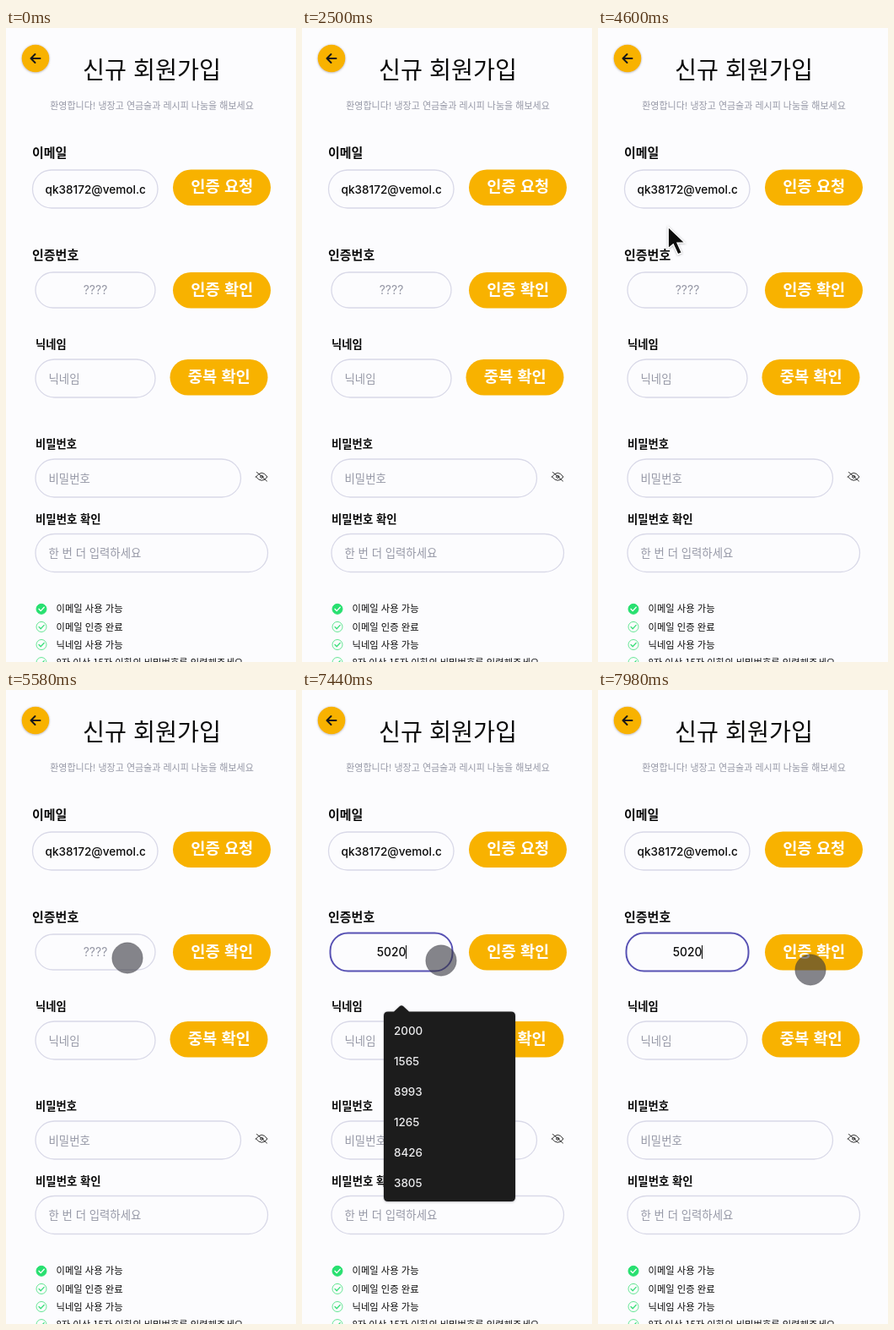
An HTML page for the animation above (8000 ms loop, 344x750 px).

```html
<!DOCTYPE html>
<html lang="ko">
<head>
<meta charset="utf-8">
<title>신규 회원가입</title>
<style>
  html, body { margin: 0; width: 100%; height: 100%; overflow: hidden; background: #fcfcfe; }
  svg { display: block; width: 344px; height: 750px; font-family: 'Noto Sans CJK KR', 'Noto Sans CJK', sans-serif; }
  .latin { font-family: Inter, Roboto, sans-serif; }
  .field { fill: none; stroke: #d9d9e8; stroke-width: 1.3; }
  .focused .field { stroke: #5852b4; stroke-width: 2; }
  .button { fill: #f8b200; }
  .line { fill: none; stroke-linecap: round; stroke-linejoin: round; }
</style>
</head>
<body>
<svg id="stage" viewBox="0 0 344 750">
  <defs>
    <clipPath id="emailClip"><rect x="46" y="170" width="119" height="42"/></clipPath>
    <filter id="soft" x="-50%" y="-50%" width="200%" height="200%">
      <feDropShadow dx="0" dy="0.5" stdDeviation="1.2" flood-color="#444450" flood-opacity=".5"/>
    </filter>
  </defs>
  <rect width="344" height="750" fill="#fcfcfe"/>
  <g id="form"></g>

  <circle cx="35" cy="36" r="16.3" fill="#f8b200" filter="url(#soft)"/>
  <path class="line" d="M40.5 36H29.5M34.5 31L29.5 36L34.5 41" stroke="#181818" stroke-width="2"/>

  <g class="line" stroke="#181818" stroke-width=".9">
    <path d="M296.5 531Q303.5 521.5 310 531Q303.5 539.5 296.5 531ZM297.5 525.5L309.5 536"/>
    <circle cx="303.3" cy="530.8" r="1.6"/>
  </g>

  <g id="code"></g>
  <g id="menu">
    <path d="M102 380.5H109L116 374Q118 372.3 120 374L127 380.5H248Q253 380.5 253 385.5V600Q253 605 248 605H102Q97 605 97 600V385.5Q97 380.5 102 380.5Z" fill="#1c1c1d" filter="url(#soft)"/>
  </g>
  <g id="pointer">
    <path id="arrow" d="M0 0V25.5L6 20.5L11.5 32.5L16 30.5L10.7 18.8L19.5 18.5Z" fill="#080808" stroke="#fff" stroke-width="1.3" filter="url(#soft)"/>
    <circle id="touch" r="18.2" fill="#36363e" fill-opacity=".6" stroke="#36363e" stroke-opacity=".3"/>
  </g>
</svg>
<script>
const $ = id => document.getElementById(id);
const form = $('form'), code = $('code'), menu = $('menu');

function add(parent, tag, attrs, content = '') {
  const node = document.createElementNS('http://www.w3.org/2000/svg', tag);
  for (const key in attrs) node.setAttribute(key, attrs[key]);
  node.textContent = content;
  return parent.appendChild(node);
}

// y is the vertical middle of the glyphs
function text(parent, content, x, y, size, weight, fill, extra = {}) {
  return add(parent, 'text', {x, y: y + size * .37, 'font-size': size, 'font-weight': weight, fill, ...extra}, content);
}

function pill(parent, kind, left, top, right, bottom) {
  return add(parent, 'rect', {class: kind, x: left, y: top, width: right - left, height: bottom - top, rx: (bottom - top) / 2});
}

const ink = '#0a0a0a', muted = '#9698a6';
const latin = {class: 'latin'}, middle = {'text-anchor': 'middle'};

text(form, '신규 회원가입', 173, 49.5, 28.3, 300, ink, middle);
text(form, '환영합니다! 냉장고 연금술과 레시피 나눔을 해보세요', 173, 91.5, 11, 300, muted, middle);

const labels = [
  ['이메일', 31, 147, 15], ['인증번호', 31, 268, 15], ['닉네임', 35, 374, 13.3],
  ['비밀번호', 35, 492, 13.3], ['비밀번호 확인', 35, 581, 13.4],
];
for (const [label, x, y, size] of labels) text(form, label, x, y, size, 700, ink);

pill(form, 'field', 31.5, 168, 180, 213);
text(form, 'qk38172@vemol.c', 46.5, 191, 13.6, 500, ink, {...latin, 'clip-path': 'url(#emailClip)'});

const inputs = [['닉네임', 392, 177], ['비밀번호', 510, 278.5], ['한 번 더 입력하세요', 598.5, 310.5]];
for (const [hint, top, right] of inputs) {
  pill(form, 'field', 35, top, right, top + 45);
  text(form, hint, 50.5, top + 23, 13.4, 500, muted);
}

const buttons = [['인증 요청', 198, 167.5], ['인증 확인', 198, 289], ['중복 확인', 194.5, 392]];
for (const [label, left, top] of buttons) {
  pill(form, 'button', left, top, left + 116, top + 42.5);
  text(form, label, left + 58.3, top + 20, 18.7, 900, '#fff', middle);
}

['이메일 사용 가능', '이메일 인증 완료', '닉네임 사용 가능', '8자 이상 15자 이하의 비밀번호를 입력해주세요'].forEach((rule, i) => {
  const y = 687.3 + 21.1 * i, done = i === 0;
  add(form, 'circle', {cx: 42, cy: y, r: 6, fill: done ? '#28e070' : 'none', stroke: done ? '#28e070' : '#62e692'});
  add(form, 'path', {class: 'line', d: `M39 ${y}l2.2 2.3l4-4.3`, stroke: done ? '#fff' : '#3ce07c', 'stroke-width': 1.3});
  text(form, rule, 59.5, y, 11.3, 300, ink);
});

const codeBox = pill(code, 'field', 35, 289, 177, 331);
const codeHint = text(code, '????', 106, 310, 14, 400, muted, {...latin, ...middle});
const codeValue = text(code, '5020', 106, 310, 13.8, 500, ink, {...latin, ...middle});
const caret = add(code, 'rect', {y: 302, width: 1, height: 16, fill: ink});

['2000', '1565', '8993', '1265', '8426', '3805'].forEach((value, i) =>
  text(menu, value, 109, 403.5 + 36 * i, 13.4, 500, '#ececee', latin));

// Pointer path: time, x, y
const path = [
  [4440, -22, 118], [4600, 83, 235], [4780, 128, 291], [5100, 144, 317],
  [6600, 144, 317], [6960, 165, 320], [7540, 165, 320], [7980, 252, 331],
];
const focusAt = 6660, menuAt = 6760, pasteAt = 7400, menuEnd = 7540, touchAt = 4680;

function pointerAt(t) {
  const next = Math.max(1, path.findIndex(([time]) => time >= t));
  const [t0, x0, y0] = path[next - 1], [t1, x1, y1] = path[next];
  const p = Math.max(0, Math.min(1, (t - t0) / (t1 - t0)));
  const eased = t0 < 4700 ? p : p * p * (3 - 2 * p);
  return [x0 + (x1 - x0) * eased, y0 + (y1 - y0) * eased];
}

function show(node, visible) {
  node.style.display = visible ? '' : 'none';
}

function render(t) {
  const focused = t >= focusAt, pasted = t >= pasteAt;
  const inset = focused ? 1.5 : 0;
  code.setAttribute('class', focused ? 'focused' : '');
  codeBox.setAttribute('x', 35 - inset);
  codeBox.setAttribute('y', 289 - inset);
  codeBox.setAttribute('width', 142 + 2 * inset);
  codeBox.setAttribute('height', 42 + 2 * inset);
  show(codeHint, !pasted);
  show(codeValue, pasted);
  show(caret, focused);
  caret.setAttribute('x', pasted ? 123 : 106);
  show(menu, t >= menuAt && t < menuEnd);

  const [x, y] = pointerAt(Math.min(t, 7980));
  $('pointer').setAttribute('transform', `translate(${x} ${y})`);
  show($('pointer'), t >= path[0][0]);
  show($('arrow'), t < touchAt);
  show($('touch'), t >= touchAt);
}

const start = performance.now();
function frame() {
  render((performance.now() - start) % 8000);
  requestAnimationFrame(frame);
}
frame();
</script>
</body>
</html>
```
